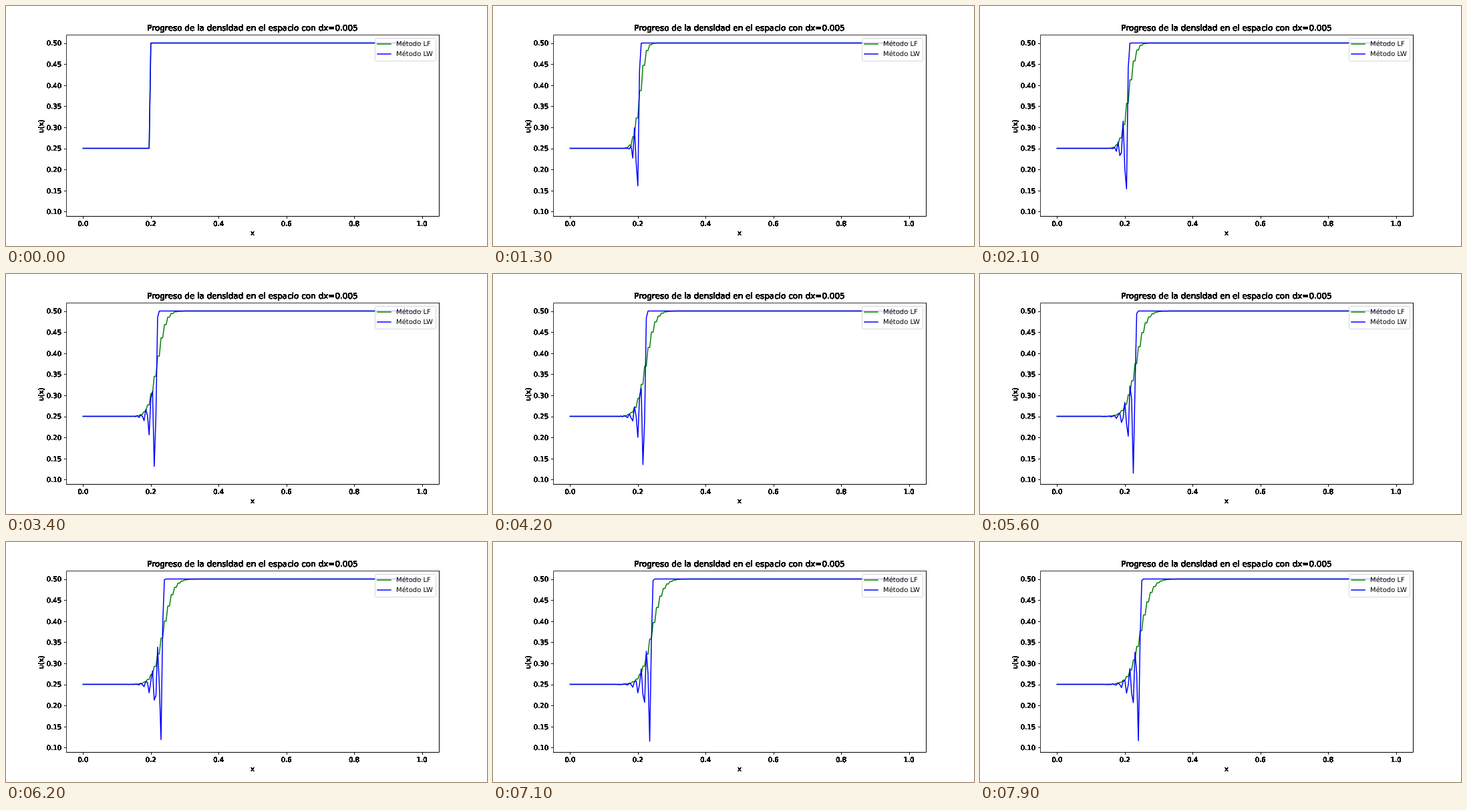
These frames come from a looping animation (720x360 px, 8000 ms). An HTML page:

```html
<!DOCTYPE html>
<html lang="es">
<head>
<meta charset="utf-8">
<title>Progreso de la densidad</title>
<style>
  html, body { margin: 0; width: 100%; height: 100%; overflow: hidden; background: #fff; }
  svg { display: block; }
  text { font: 10px "DejaVu Sans", sans-serif; text-rendering: geometricPrecision; }
  .title { font-size: 12px; }
  .middle { text-anchor: middle; }
  .end { text-anchor: end; }
  .curve { fill: none; stroke-width: 1.5; stroke-linejoin: round; stroke-linecap: square; }
  .lf { stroke: #008000; }
  .lw { stroke: #0000ff; }
</style>
</head>
<body>
<svg width="720" height="360" viewBox="0 0 720 360">
  <!-- Turns soft glyph edges into solid black pixels. -->
  <filter id="hard" filterUnits="userSpaceOnUse" x="0" y="0" width="720" height="360" color-interpolation-filters="sRGB">
    <feComponentTransfer><feFuncA type="linear" slope="40" intercept="-1.2"/></feComponentTransfer>
  </filter>
  <g id="labels" filter="url(#hard)">
    <text class="title middle" x="369" y="37">Progreso de la densidad en el espacio con dx=0.005</text>
    <text class="middle" x="369" y="344">x</text>
    <text class="middle" transform="translate(56 180.5) rotate(-90)">u(x)</text>
  </g>
  <path id="ticks" stroke="#000" shape-rendering="crispEdges"/>
  <path id="lf" class="curve lf"/>
  <path id="lw" class="curve lw"/>
  <path d="M90.5 316V43.5H648" fill="none" stroke="#333"/>
  <path d="M648.5 43V315.5H90" fill="none" stroke="#000"/>
  <rect x="552.5" y="48.5" width="91" height="34" rx="2" fill="#fff" stroke="#ccc" opacity="0.8"/>
  <path class="curve lf" d="M556 57H576"/>
  <path class="curve lw" d="M556 72H576"/>
  <text x="584" y="60">Método LF</text>
  <text x="584" y="75">Método LW</text>
</svg>
<script>
const STEPS = 80, STEP_MS = 100, CELLS = 200;
const RATIO = 0.5; // dt / dx
const LOW = 0.25, HIGH = 0.5;
const el = id => document.getElementById(id);

const flux = u => u * (1 - u);
const blend = (a, b) => (a + b) / 2 - RATIO / 2 * (flux(b) - flux(a));

// Both schemes keep the end cells fixed.
const inner = rule => u => u.map((v, i) =>
  i === 0 || i === CELLS ? v : rule(u[i - 1], v, u[i + 1]));
const laxFriedrichs = inner((left, mid, right) => blend(left, right));
const laxWendroff = inner((left, mid, right) =>
  mid - RATIO * (flux(blend(mid, right)) - flux(blend(left, mid))));

function solve(advance) {
  const states = [Array.from({ length: CELLS + 1 }, (_, i) => i < 40 ? LOW : HIGH)];
  while (states.length < STEPS) states.push(advance(states[states.length - 1]));
  return states;
}

const states = { lf: solve(laxFriedrichs), lw: solve(laxWendroff) };

// The data fill the axes except for a 5 % margin on every side.
const axes = { left: 90, top: 43.2, width: 558, height: 271.8 };
const lowest = Math.min(...states.lw.flat());
const inset = f => (f + 0.05) / 1.1;
const px = x => axes.left + axes.width * inset(x);
const py = u => axes.top + axes.height * inset((HIGH - u) / (HIGH - lowest));

const toPath = u => "M" + u.map((v, i) =>
  px(i / CELLS).toFixed(2) + " " + py(v).toFixed(2)).join("L");

function addLabel(text, x, y, cls) {
  const node = document.createElementNS("http://www.w3.org/2000/svg", "text");
  node.setAttribute("x", x);
  node.setAttribute("y", y);
  node.setAttribute("class", cls);
  node.textContent = text;
  el("labels").append(node);
}

function drawTicks() {
  let d = "";
  for (let i = 0; i <= 5; i++) {
    const x = px(i / 5);
    d += `M${Math.round(x) + 0.5} 316v3`;
    addLabel((i / 5).toFixed(1), x, 330, "middle");
  }
  for (let i = 2; i <= 10; i++) {
    const y = py(i / 20);
    d += `M87 ${Math.round(y) + 0.5}h3`;
    addLabel((i / 20).toFixed(2), 83, Math.round(y + 3.8), "end");
  }
  el("ticks").setAttribute("d", d);
}

const paths = { lf: states.lf.map(toPath), lw: states.lw.map(toPath) };
const start = performance.now();

function render(now) {
  const step = Math.floor(Math.max(0, now - start) / STEP_MS) % STEPS;
  for (const id in paths) el(id).setAttribute("d", paths[id][step]);
}

function loop(now) {
  render(now);
  requestAnimationFrame(loop);
}

drawTicks();
render(start);
requestAnimationFrame(loop);
</script>
</body>
</html>
```
